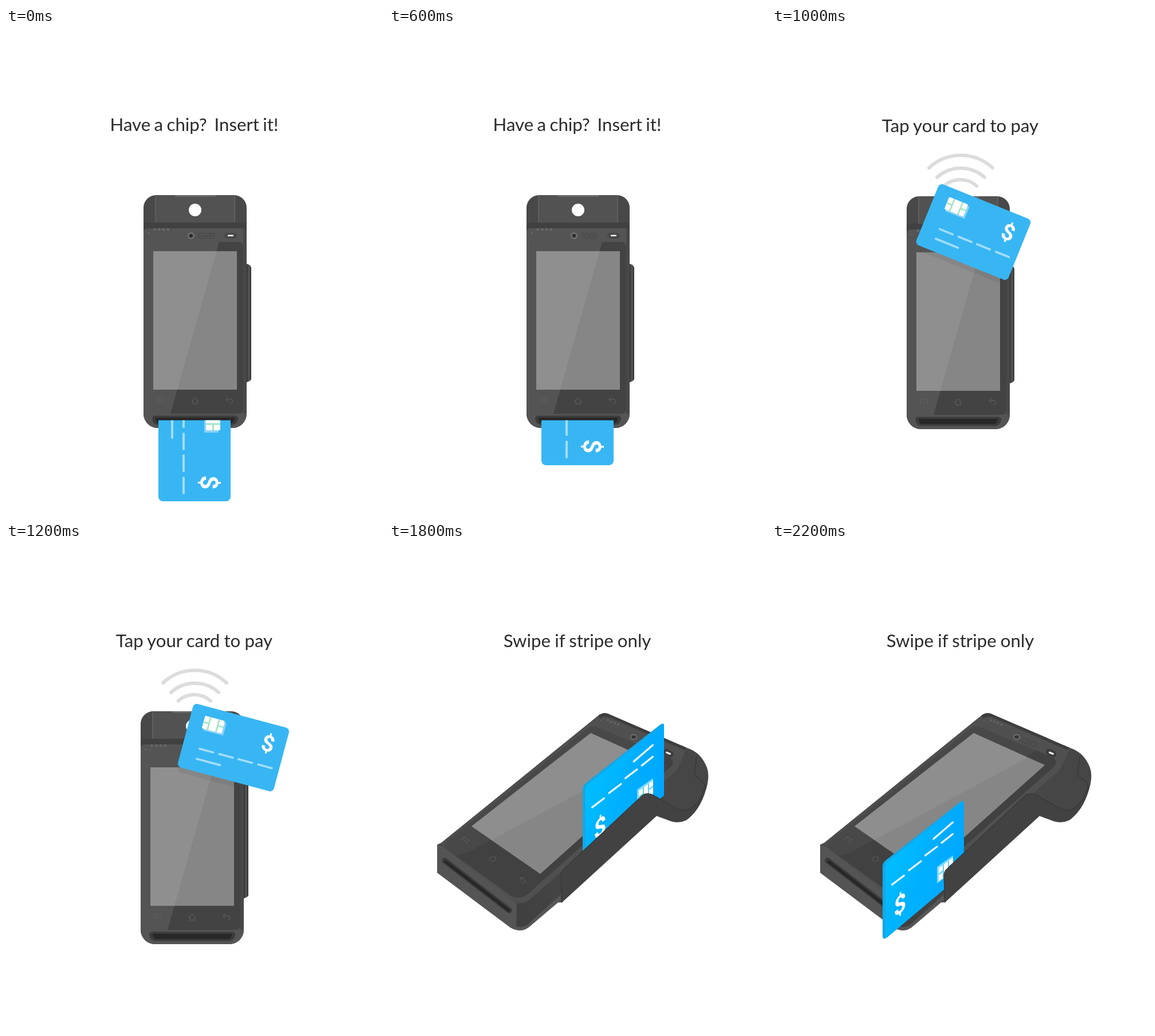
Recreate the animation shown at these times as an HTML page. Size 658 by 851 pixels, loop 2400 ms.

```html
<!DOCTYPE html>
<html lang="en">
<head>
<meta charset="utf-8">
<title>Ways to pay</title>
<style>
  html, body { margin: 0; width: 100%; height: 100%; overflow: hidden; background: #fff; }
  svg { display: block; width: 658px; height: 851px; }
  text { text-anchor: middle; }
  .title { font: 31.2px Lato, sans-serif; word-spacing: -.8px; fill: #2b2b2b; }
  #insert .title { word-spacing: -1.6px; }
  .dollar { font-family: Roboto, sans-serif; font-weight: 700; fill: #fff; }
  .line { fill: none; stroke-linecap: round; stroke-linejoin: round; }
</style>
</head>
<body>
<svg viewBox="0 0 658 851">
  <defs>
    <clipPath id="belowSlot"><rect x="240" y="685.500" width="180" height="166"/></clipPath>
    <clipPath id="glass"><rect x="252" y="392" width="146" height="242"/></clipPath>
    <clipPath id="shell"><path d="M240 314A22 22 0 0 1 262 292H398A22 22 0 0 1 420 314V674A25 25 0 0 1 395 699H265A25 25 0 0 1 240 674Z"/></clipPath>
    <linearGradient id="blue" x1="0" y1="0" x2="1" y2=".5">
      <stop offset="0" stop-color="#00c3ff"/><stop offset="1" stop-color="#00a5ff"/>
    </linearGradient>
    <linearGradient id="side" x1="0" y1="1" x2="1" y2="0">
      <stop offset="0" stop-color="#3f3f3f"/><stop offset="1" stop-color="#454545"/>
    </linearGradient>

    <g id="menu" class="line"><path d="M-6 5V-4H6V5M-2.500 1H2.500"/></g>
    <g id="home" class="line"><path d="M-6 0L0-6L6 0H4V5H-4V0Z"/></g>
    <g id="back" class="line"><path d="M-2-6L-6-2L-2 2M-6-2H2Q6-2 6 1.500T2 5"/></g>

    <!-- Landscape card, 190 x 126 -->
    <g id="card">
      <rect width="190" height="126" rx="8" fill="#38b6f3"/>
      <rect x="30" y="21" width="40" height="25" rx="1" fill="#8bd3f8"/>
      <rect x="27" y="18" width="39" height="25" rx="2" fill="#fff"/>
      <path d="M38 18V43M55 18V43M27 30.500H38M55 30.500H66" stroke="#a5e3c4" stroke-width="3"/>
      <path class="line" d="M33 82H60M72 82H99M110 82H137M149 82H176M33 102H79" stroke="#a4dcfa" stroke-width="4"/>
      <text class="dollar" x="157" y="53.500" font-size="43">$</text>
    </g>

    <!-- Terminal seen from above -->
    <g id="terminal">
      <path d="M418 411L425 414Q428 416 428 419V612Q428 616 425 617L418 620Z" fill="#505050"/>
      <path d="M421 413V618M427 418V614" stroke="#3a3a3a" stroke-width="2"/>
      <g clip-path="url(#shell)">
        <rect x="240" y="292" width="180" height="407" fill="#484848"/>
        <path d="M240 350H414V674H420V699H240Z" fill="#545454"/>
        <rect x="261" y="292" width="139" height="48" fill="#525252"/>
        <path d="M240 340H420V354Q418 350 411 350H248Q242 350 240 355Z" fill="#414141"/>
      </g>
      <path d="M261 292V340M399 292V340" stroke="#666" stroke-width="1.500"/>
      <rect x="295" y="292" width="71" height="3" fill="#686868"/>
      <circle cx="330" cy="318" r="11" fill="#fff"/>
      <g fill="#6b6b6b">
        <circle cx="249" cy="358.500" r="1.500"/>
        <circle cx="259.500" cy="352" r="2.200"/><circle cx="267.300" cy="352" r="2.200"/>
        <circle cx="275" cy="352" r="2.200"/><circle cx="282.800" cy="352" r="2.200"/>
      </g>
      <circle cx="323" cy="363" r="4.800" fill="#3b3b3b" stroke="#7a7a7a" stroke-width="2"/>
      <circle cx="323" cy="363" r="1.800" fill="#222"/>
      <g class="line" stroke="#464646">
        <rect x="336.500" y="358.500" width="13" height="9" rx="3"/><rect x="350.500" y="358.500" width="13" height="9" rx="3"/>
        <path d="M340 363H346M354 363H360M357 360V366"/>
      </g>
      <rect x="381" y="358" width="22" height="10" rx="5" fill="#484848"/>
      <rect x="387" y="361.500" width="10" height="2.500" rx="1" fill="#fff"/>
      <path d="M372 374H406Q414 374 414 382V666Q414 674 406 674H287Z" fill="#434343"/>
      <rect x="257" y="390" width="146" height="242" fill="#8f8f8f"/>
      <path d="M367.500 390H403V632H299Z" fill="#868686"/>
      <g stroke="#626262">
        <use href="#menu" x="270" y="651"/><use href="#home" x="330" y="652"/><use href="#back" x="390" y="651"/>
      </g>
      <path d="M261 677.500H399Q405 677.500 405 683Q403 693.500 394 693.500H266Q257 693.500 255 683Q255 677.500 261 677.500Z" fill="#3b3b3b"/>
      <path d="M261 681H399Q399 690 392 690H268Q261 690 261 681Z" fill="#272727"/>
    </g>
  </defs>

  <g id="insert">
    <text class="title" x="328.500" y="180">Have a chip?&#160; Insert it!</text>
    <use href="#terminal"/>
    <g clip-path="url(#belowSlot)"><use id="chipCard" href="#card"/></g>
  </g>

  <g id="idle"><use href="#terminal" x="-5"/></g>

  <g id="tap">
    <text class="title" x="328.500" y="182">Tap your card to pay</text>
    <path class="line" d="M274 244.500A81 81 0 0 1 385 244.500M288 261A62 62 0 0 1 371 261M300.500 276A42 42 0 0 1 357 276" stroke="#dcdcdc" stroke-width="6"/>
    <use href="#terminal" x="-5" y="2"/>
    <g clip-path="url(#glass)"><use id="tapShade" href="#card" opacity=".06" style="filter:brightness(0)"/></g>
    <use id="tapCard" href="#card"/>
  </g>

  <g id="swipe">
    <text class="title" x="328.500" y="182">Swipe if stripe only</text>
    <!-- Body -->
    <path d="M84 527L91 524L366 301Q376 294 386 300L520 358L500 420L302 620V628H293L248 668Q230 683 212 672L84 576Z" fill="#474747"/>
    <path d="M84 527L92 529L223 630V675Q217 675 212 672L84 576Z" fill="#545454"/>
    <path d="M223 631Q238 630 250 620L302 574V620L246 668Q236 677 222 670Z" fill="url(#side)"/>
    <path d="M222 670Q236 674 246 663L300 614V624L248 668Q236 680 222 676Z" fill="#565656"/>
    <path d="M91 526L367 302Q376 297 386 302L520 360L503 396L250 619Q234 634 214 624Z" fill="#505050"/>
    <path d="M366 301Q376 294 386 300L520 358L516 362L385 305Q376 301 368 307Z" fill="#3e3e3e"/>
    <path d="M97 524L345 325Q354 318 364 322L490 375Q500 382 493 390L245 611Q229 626 212 616L100 534Q94 529 97 524Z" fill="#484848"/>
    <path d="M137 541L462 363L490 375Q500 382 493 390L245 611Q229 626 212 616L116 546Z" fill="#414141"/>
    <path d="M144 495L352 332L476 388L264 578Z" fill="#8e8e8e"/>
    <path d="M179 519L446 375L476 388L264 578Z" fill="#868686"/>
    <g stroke="#5d5d5d">
      <use href="#menu" transform="matrix(.8 .52 -.75 .62 133 519)"/>
      <use href="#home" transform="matrix(.8 .52 -.75 .62 181 552)"/>
      <use href="#back" transform="matrix(.8 .52 -.75 .62 233 589)"/>
    </g>
    <path class="line" d="M382 310L402 318" stroke="#646464" stroke-width="4" stroke-dasharray="0 6.500"/>
    <circle cx="370" cy="310" r="1.200" fill="#646464"/>
    <ellipse cx="427" cy="339" rx="5" ry="4" fill="#333" stroke="#717171" stroke-width="2"/>
    <g class="line" stroke="#3f3f3f">
      <ellipse cx="443" cy="346" rx="6" ry="4"/><ellipse cx="456" cy="351.500" rx="6" ry="4"/>
    </g>
    <path class="line" d="M483 365L491 369" stroke="#3c3c3c" stroke-width="11"/>
    <path class="line" d="M484.500 366L490.500 368.500" stroke="#fff" stroke-width="3"/>
    <path class="line" d="M97 555L210 642" stroke="#3b3b3b" stroke-width="10"/>
    <path class="line" d="M99 557L209 642" stroke="#272727" stroke-width="5"/>
    <!-- Rounded back end -->
    <path d="M520 358Q542 365 552 386Q560 400 556 420Q545 465 518 485L470 450L503 396Z" fill="#464646"/>

    <g id="swipeCard">
      <path d="M338 430Q338 424 344 419L474 317Q480 313 480 319V441L346 554Q338 560 338 551Z" fill="#14a7e6"/>
      <path d="M343 431Q343 425 348 421L474 321Q480 316 480 322V441L346 554Q343 556 343 550Z" fill="url(#blue)"/>
      <path d="M343 510L440 345L474 321Q480 316 480 322V350L360 542L346 554Z" fill="#0098ff" opacity=".1"/>
      <path class="line" d="M354.500 462L375.500 446M384 437L405 421M412.500 411L433 395.500M441 389L460.500 373.500M427 382L460.500 353" stroke="#fff" stroke-width="3"/>
      <path d="M433 431L461 411V439L433 460Z" fill="#7edcff"/>
      <path d="M436 433L461 415V437L436 456Z" fill="#fff"/>
      <path d="M444 427V450M453 421V443M436 444L444 438M453 431L461 425" stroke="#5accff" stroke-width="2"/>
      <text class="dollar" transform="matrix(.85 -.66 0 1 368.500 496)" y="16" font-size="44">$</text>
    </g>

    <!-- Rail that hides the lower edge of the card -->
    <path d="M302 628L300 581Q300 574 307 568L439 444Q448 434 460 440L503 464Q518 471 530 462Q545 450 551 427L556 420Q547 462 522 482Q506 493 486 484L467 477Z" fill="#424242"/>
    <path class="line" d="M302 628L300 581Q300 574 307 568L439 444Q448 434 460 440L503 464Q518 471 530 462Q545 450 551 427Q552 420 547 417L533 405Q535 390 537 373" stroke="#363636" stroke-width="1.200"/>
  </g>
</svg>
<script>
  const el = id => document.getElementById(id);
  const move = (id, value) => el(id).setAttribute('transform', value);
  const STEP = 200, COUNT = 12;
  const scenes = { insert: 0, idle: 4, tap: 5, swipe: 9 };

  function poseTap(x, y, angle) {
    const pose = dy => `translate(${x} ${y + dy}) rotate(${angle}) scale(.913) translate(-95 -63)`;
    move('tapCard', pose(0));
    move('tapShade', pose(9));
  }

  function draw() {
    // The motion advances in hard steps
    const step = Math.floor(performance.now() / STEP) % COUNT;
    const current = Object.keys(scenes).filter(name => scenes[name] <= step).pop();
    for (const name in scenes) el(name).style.display = name === current ? '' : 'none';

    if (current === 'insert') {
      const rise = 63 * (1 - Math.cos(Math.PI * step / 3)) / 2;
      move('chipCard', `translate(392 ${637 - rise}) rotate(90)`);
    } else if (current === 'tap') {
      if (step === scenes.tap) poseTap(351.5, 356.5, 22);
      else poseTap(397, 357.5, 15);
    } else if (current === 'swipe') {
      const slide = 36.25 * (step - scenes.swipe) ** 2;
      move('swipeCard', `translate(${-slide} ${slide * .931})`);
    }
    requestAnimationFrame(draw);
  }
  draw();
</script>
</body>
</html>
```
